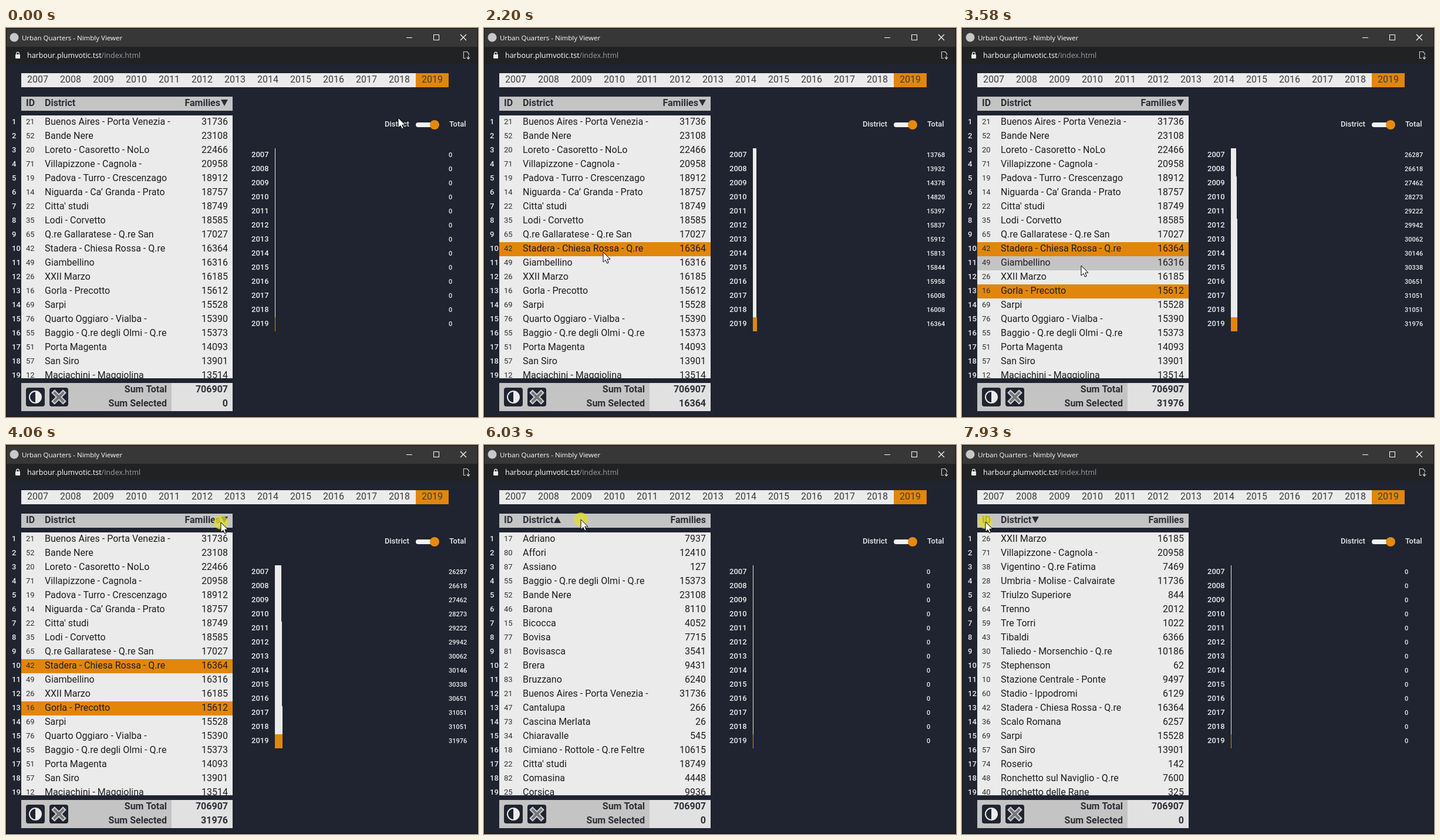
An HTML page with a canvas that plays this animation: 804x663 px, repeating every 8 s.

```html
<!DOCTYPE html>
<html lang="en">
<head>
<meta charset="utf-8">
<title>Urban Quarters</title>
<style>
html, body { margin: 0; width: 100%; height: 100%; overflow: hidden; background: #1f2430; }
canvas { display: block; }
</style>
</head>
<body>
<canvas id="stage" width="804" height="663"></canvas>
<script>
const ctx = document.getElementById('stage').getContext('2d');
const LOOP = 8000, STEP = 80;
const BG = '#1f2430', PALE = '#ebebeb', GREY = '#c4c4c4', ORANGE = '#e2860b', INK = '#1e1e20', HEAD = '#2b2e36';
const UI = '"Open Sans", "Noto Sans", sans-serif';

// id, name, families
const rows = `21 Buenos Aires - Porta Venezia - 31736
52 Bande Nere 23108
20 Loreto - Casoretto - NoLo 22466
71 Villapizzone - Cagnola - 20958
19 Padova - Turro - Crescenzago 18912
14 Niguarda - Ca’ Granda - Prato 18757
22 Citta' studi 18749
35 Lodi - Corvetto 18585
65 Q.re Gallaratese - Q.re San 17027
42 Stadera - Chiesa Rossa - Q.re 16364
49 Giambellino 16316
26 XXII Marzo 16185
16 Gorla - Precotto 15612
69 Sarpi 15528
76 Quarto Oggiaro - Vialba - 15390
55 Baggio - Q.re degli Olmi - Q.re 15373
51 Porta Magenta 14093
57 San Siro 13901
12 Maciachini - Maggiolina 13514
8 Parco Sempione 2
3 Giardini P.ta Venezia 26
73 Cascina Merlata 26
84 Parco Nord 46
75 Stephenson 62
87 Assiano 127
74 Roserio 142
86 Parco dei Navigli 148
85 Parco delle Abbazie 177
39 Quintosole 178
47 Cantalupa 266
88 Parco Bosco in citta' 279
40 Ronchetto delle Rane 325
34 Chiaravalle 545
24 Parco Forlanini - Cavriano 596
32 Triulzo Superiore 844
59 Tre Torri 1022
63 Figino 1170
54 Muggiano 1433
17 Adriano 7937
80 Affori 12410
46 Barona 8110
15 Bicocca 4052
77 Bovisa 7715
81 Bovisasca 3541
2 Brera 9431
83 Bruzzano 6240
18 Cimiano - Rottole - Q.re Feltre 10615
82 Comasina 4448
25 Corsica 9936
38 Vigentino - Q.re Fatima 7469
28 Umbria - Molise - Calvairate 11736
64 Trenno 2012
43 Tibaldi 6366
30 Taliedo - Morsenchio - Q.re 10186
10 Stazione Centrale - Ponte 9497
60 Stadio - Ippodromi 6129
36 Scalo Romana 6257
48 Ronchetto sul Naviglio - Q.re 7600`.split('\n').map(line => {
  const [, id, name, families] = line.match(/^(\d+) (.+) (\d+)$/);
  return { id, name, families: +families };
});

const nums = s => s.split(' ').map(Number);
const one = nums('13768 13932 14378 14820 15397 15837 15912 15813 15844 15958 16008 16008 16364');
const two = nums('26287 26618 27462 28273 29222 29942 30062 30146 30338 30651 31051 31051 31976');
const none = one.map(() => 0);
const TOTAL = 706907, FULL = 300;

// start, chart values, selected rows, start of bar easing, easing rate per second
const picks = [
  { at: 0, values: none, names: [], ease: 0, rate: 4 },
  { at: 1310, values: one, names: ['Stadera'], ease: 1310, rate: 3.5 },
  { at: 3180, values: two, names: ['Stadera', 'Gorla'], ease: 3200, rate: 2.68 },
  { at: 4140, values: none, names: [], ease: 4140, rate: 4.3 }
];

const sorted = (key, dir) => [...rows].sort((a, b) =>
  dir * (a[key] < b[key] ? -1 : a[key] > b[key] ? 1 : 0)).slice(0, 19);
const sorts = [
  [0, 'families', -1], [4140, 'families', 1], [5210, 'families', -1],
  [6030, 'name', 1], [7100, 'name', -1]
].map(([at, key, dir]) => ({ at, key, dir, list: sorted(key, dir) }));

// pointer: start, steps, x, y
const moves = [
  [170, 3, 552, 364], [580, 6, 203, 382], [2280, 2, 176, 437], [3020, 2, 174, 455],
  [3580, 4, 362, 137], [3900, 1, 366, 132], [5710, 4, 165, 127], [6440, 2, 132, 127],
  [6690, 2, 120, 127], [7600, 2, 43, 131], [7850, 1, 40, 131]
];
const clicks = [[1310, 80], [2690, 80], [3180, 80], [4060, 80], [5210, 80], [6030, 80], [7100, 170], [7930, 70]];

const current = (list, t) => list.filter(e => e.at <= t).pop();

function pointerAt(t) {
  let x = 668, y = 153;
  for (const [at, n, tx, ty] of moves) {
    if (t < at) break;
    const k = Math.min(1, (Math.floor((t - at) / STEP) + 1) / n);
    const e = k * k * (3 - 2 * k);
    x += (tx - x) * e;
    y += (ty - y) * e;
  }
  return { x: Math.round(x), y: Math.round(y) };
}

function barWidth(i, t) {
  let w = 0;
  picks.forEach((p, n) => {
    const end = Math.min(t, n + 1 < picks.length ? picks[n + 1].ease : t);
    const dt = Math.max(0, end - p.ease) / 1000;
    w += (p.values[i] * FULL / TOTAL - w) * (1 - Math.exp(-p.rate * dt));
  });
  return Math.max(1, Math.round(w));
}

function box(x, y, w, h, color) {
  ctx.fillStyle = color;
  ctx.fillRect(x, y, w, h);
}

function text(s, x, y, color, font, align = 'left') {
  ctx.font = font;
  ctx.textAlign = align;
  ctx.fillStyle = color;
  ctx.fillText(s, x, y);
}

const roboto = (size, weight = 400) => `${weight} ${size}px Roboto, sans-serif`;

function disc(x, y, r, color) {
  ctx.fillStyle = color;
  ctx.beginPath();
  ctx.arc(x, y, r, 0, 7);
  ctx.fill();
}

function pill(x, y, w, h, r, color) {
  ctx.fillStyle = color;
  ctx.beginPath();
  ctx.roundRect(x, y, w, h, r);
  ctx.fill();
}

function line(points, color, width) {
  ctx.strokeStyle = color;
  ctx.lineWidth = width;
  ctx.beginPath();
  for (const [x1, y1, x2, y2] of points) {
    ctx.moveTo(x1, y1);
    ctx.lineTo(x2, y2);
  }
  ctx.stroke();
}

function poly(points, color) {
  ctx.fillStyle = color;
  ctx.beginPath();
  points.forEach(([x, y]) => ctx.lineTo(x, y));
  ctx.closePath();
  ctx.fill();
}

function drawWindow() {
  box(0, 0, 804, 663, BG);
  box(0, 0, 804, 32, '#373737');
  box(0, 32, 804, 29, '#212224');
  disc(14, 16, 7.5, '#c8c8c8');
  text('Urban Quarters - Nimbly Viewer', 27, 21, '#fff', '11.5px ' + UI);
  line([[682, 16.5, 692, 16.5]], '#fff', 1);
  ctx.strokeRect(728.5, 11.5, 9, 9);
  line([[774, 11, 784, 21], [784, 11, 774, 21]], '#fff', 1.2);

  pill(16, 45, 8, 7, 1, '#e8eaed');
  ctx.strokeStyle = '#e8eaed';
  ctx.lineWidth = 1.3;
  ctx.beginPath();
  ctx.arc(20, 43.5, 2.3, Math.PI, 0);
  ctx.lineTo(22.3, 46);
  ctx.moveTo(17.7, 43.5);
  ctx.lineTo(17.7, 46);
  ctx.stroke();
  const host = 'harbour.plumvotic.tst';
  text(host, 36, 51, '#fff', '12.5px ' + UI);
  text('/index.html', 36 + ctx.measureText(host).width, 51, '#9aa0a6', '12.5px ' + UI);

  line([[779.5, 40, 779.5, 52], [779, 40.5, 785, 40.5], [785, 40, 788.5, 44], [788.5, 44, 788.5, 46],
    [779, 51.5, 783, 51.5], [787.5, 47, 787.5, 53], [785, 50, 787.5, 53], [790, 50, 787.5, 53]], '#c8cacd', 1.2);
  ctx.strokeStyle = '#121212';
  ctx.lineWidth = 1;
  ctx.strokeRect(0.5, 0.5, 803, 662);
}

function drawYears() {
  box(26, 77, 728, 24, PALE);
  box(698, 77, 56, 24, ORANGE);
  for (let i = 0; i < 13; i++) text(2007 + i, 54 + 56 * i, 93, '#3c3c40', roboto(16), 'center');
}

function drawArrow(x, dir) {
  const base = dir > 0 ? 133 : 122, tip = dir > 0 ? 122 : 133;
  poly([[x, base], [x + 12, base], [x + 6, tip]], HEAD);
}

function drawTable(sort, pick, mouse) {
  const bold = roboto(16, 700), byName = sort.key === 'name';
  box(26, 117, 360, 24, GREY);
  text('ID', 34, 133, HEAD, bold);
  text('District', 66, 133, HEAD, bold);
  text('Families', byName ? 378 : 365, 133, HEAD, bold, 'right');
  drawArrow(byName ? 119 : 366, sort.dir);

  ctx.save();
  ctx.beginPath();
  ctx.rect(0, 149, 386, 448);
  ctx.clip();
  box(26, 149, 360, 448, PALE);
  sort.list.forEach((r, i) => {
    const y = 149 + 24 * i;
    const over = mouse.x > 26 && mouse.x < 386 && mouse.y > y && mouse.y < y + 24;
    if (pick.names.some(n => r.name.startsWith(n))) box(26, y, 360, 24, ORANGE);
    else if (over) box(26, y, 360, 24, GREY);
    text(i + 1, 10, y + 15, PALE, roboto(13, 500));
    text(r.id, 34, y + 15, '#303033', roboto(13));
    text(r.name, 66, y + 16, INK, roboto(16));
    text(r.families, 378, y + 16, INK, roboto(16), 'right');
  });
  ctx.restore();
}

function drawFooter(pick) {
  const bold = roboto(16, 700);
  box(26, 605, 256, 48, GREY);
  box(282, 605, 104, 48, '#e1e1e1');
  [['Sum Total', TOTAL], ['Sum Selected', pick.values[12]]].forEach(([label, value], i) => {
    text(label, 274, 621 + 24 * i, HEAD, bold, 'right');
    text(value, 378, 621 + 24 * i, HEAD, bold, 'right');
  });

  pill(34, 613, 32, 32, 4, BG);
  ctx.strokeStyle = ctx.fillStyle = PALE;
  ctx.lineWidth = 2;
  ctx.beginPath();
  ctx.arc(50, 629, 10, 0, 7);
  ctx.stroke();
  ctx.beginPath();
  ctx.arc(50, 629, 10, -Math.PI / 2, Math.PI / 2);
  ctx.fill();

  pill(74, 613, 32, 32, 4, BG);
  const cross = d => [[90 - d, 629 - d, 90 + d, 629 + d], [90 + d, 629 - d, 90 - d, 629 + d]];
  line(cross(10), '#d2d2d2', 8);
  line(cross(8.5), '#74767b', 4);
}

function drawChart(pick, t) {
  text('District', 645, 168, PALE, roboto(13, 500));
  text('Total', 755, 168, PALE, roboto(13, 500));
  pill(698, 161, 36, 8, 4, '#f2f2f2');
  disc(730, 165, 8, '#e8890c');
  for (let i = 0; i < 13; i++) {
    const y = 205 + 24 * i;
    text(2007 + i, 418, y + 15, PALE, roboto(13, 500));
    text(pick.values[i], 754, y + 15, PALE, roboto(11, 500));
    box(458, y, barWidth(i, t), 24, i === 12 ? ORANGE : PALE);
  }
}

function drawPointer(mouse, pressed) {
  const { x, y } = mouse;
  if (pressed) disc(x, y, 12, 'rgba(226, 222, 40, 0.75)');
  const shape = [[0, 0], [0, 17], [4, 13.4], [6.6, 19], [9.2, 18], [6.8, 12.2], [12, 12]];
  poly(shape.map(([a, b]) => [x + a, y + b]), '#fff');
  ctx.strokeStyle = '#000';
  ctx.lineWidth = 1;
  ctx.stroke();
}

function draw(t) {
  const sort = current(sorts, t), pick = current(picks, t), mouse = pointerAt(t);
  drawWindow();
  drawYears();
  drawTable(sort, pick, mouse);
  drawFooter(pick);
  drawChart(pick, t);
  drawPointer(mouse, clicks.some(([at, len]) => t >= at && t < at + len));
}

let start;
function tick(now) {
  if (start === undefined) start = now;
  draw((now - start) % LOOP);
  requestAnimationFrame(tick);
}
draw(0);
requestAnimationFrame(tick);
</script>
</body>
</html>
```
